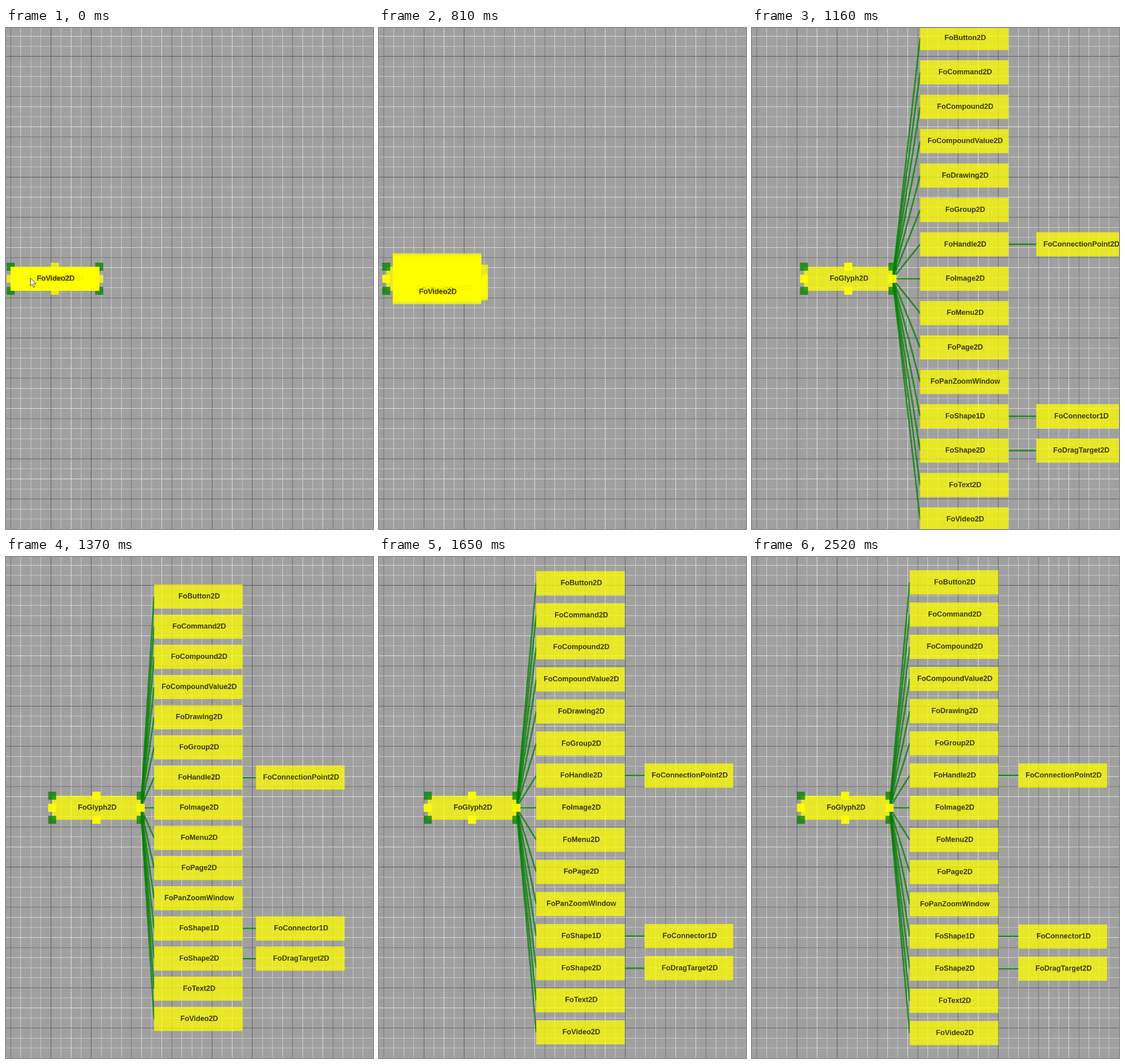
Recreate the animation shown at these times as an HTML page with a canvas. Size 640 by 875 pixels, loop 3.86 s.

```html
<!DOCTYPE html>
<html lang="en">
<head>
<meta charset="utf-8">
<title>Class tree</title>
<style>
  html, body { margin: 0; width: 100%; height: 100%; overflow: hidden; background: #a0a0a0; }
  canvas { display: block; width: 640px; height: 875px; }
</style>
</head>
<body>
<canvas id="stage" width="640" height="875"></canvas>
<script>
const stage = document.getElementById('stage');
const out = stage.getContext('2d');
out.imageSmoothingQuality = 'low';

// The diagram is drawn at full size, then shrunk onto the stage
const page = document.createElement('canvas');
const W = page.width = 911, H = page.height = 1245;
const ctx = page.getContext('2d');

const LOOP = 3860;
const X0 = 11.4, CY = 623;              // where the tree unfolds from
const BW = 220, BH = 60, KNOB = 20;
const ALPHA = 0.75;

// Depth-first order: [name, level, row relative to the root]
const NODES = [];
const LEAVES = { FoHandle2D: 'FoConnectionPoint2D', FoShape1D: 'FoConnector1D', FoShape2D: 'FoDragTarget2D' };
['FoButton2D', 'FoCommand2D', 'FoCompound2D', 'FoCompoundValue2D', 'FoDrawing2D',
 'FoGroup2D', 'FoHandle2D', 'FoImage2D', 'FoMenu2D', 'FoPage2D', 'FoPanZoomWindow',
 'FoShape1D', 'FoShape2D', 'FoText2D', 'FoVideo2D'].forEach((name, i) => {
  NODES.push([name, 1, i - 7]);
  if (LEAVES[name]) NODES.push([LEAVES[name], 2, i - 7]);
});

// Moments at which the picture refreshes
const SHORT = [4, 6, 12, 28];
const STEPS = 29;
const TICKS = [0];
for (let i = 0; i < STEPS; i++) TICKS.push(TICKS[i] + (SHORT.includes(i) ? 60 : 70));
TICKS.push(2450, 2520);

// Elastic ease in and out, sampled at an even rate
function spread(step) {
  if (step < 1) return 0;
  if (step >= STEPS) return 1;
  const ms = step * 68.05 - 1065;
  const wave = 0.5 * Math.pow(2, -10 * Math.abs(ms) / 1030) * Math.cos(2 * Math.PI * ms / 316);
  return ms < 0 ? wave : 1 - wave;
}

function line(x1, y1, x2, y2) {
  ctx.beginPath();
  ctx.moveTo(x1, y1);
  ctx.lineTo(x2, y2);
  ctx.stroke();
}

function gridLines(major) {
  for (let i = -3; i < 52; i++) {
    if ((i % 4 === 0) !== major) continue;
    line(11.5 + i * 25, 0, 11.5 + i * 25, H);
    line(0, 70.5 + i * 25, W, 70.5 + i * 25);
  }
}

function drawGrid() {
  ctx.fillStyle = '#a0a0a0';
  ctx.fillRect(0, 0, W, H);
  ctx.lineWidth = 1;
  ctx.strokeStyle = 'rgba(255,255,255,.8)';
  ctx.setLineDash([5, 1]);
  gridLines(false);
  ctx.setLineDash([]);
  ctx.strokeStyle = '#555';
  gridLines(true);
}

function drawBox(name, x, y) {
  ctx.fillStyle = '#ff0';
  ctx.fillRect(x, y - BH / 2, BW, BH);
  ctx.fillStyle = '#000';
  ctx.fillText(name, x + BW / 2 + 2, y + 5);
}

function drawKnobs(x, bright) {
  for (let i = 0; i < 3; i++) {
    for (let j = 0; j < 3; j++) {
      if (i === 1 && j === 1) continue;
      const corner = i !== 1 && j !== 1;
      ctx.fillStyle = corner ? '#008000' : '#ff0';
      ctx.globalAlpha = !corner && bright ? 0.93 : ALPHA;
      ctx.fillRect(x + i * BW / 2 - KNOB / 2, CY + (j - 1) * BH / 2 - KNOB / 2, KNOB, KNOB);
    }
  }
  ctx.globalAlpha = ALPHA;
}

function drawPointer(x, y) {
  out.beginPath();
  [[0.5, 0.5], [0.5, 14.5], [3.7, 11.6], [6, 17], [8.3, 16], [6, 10.8], [10.5, 10.6]]
    .forEach(([a, b]) => out.lineTo(x + a, y + b));
  out.closePath();
  out.fillStyle = '#eee';
  out.fill();
  out.lineWidth = 0.9;
  out.strokeStyle = '#444';
  out.stroke();
}

function draw(step) {
  const t = TICKS[step], p = spread(step);
  const left = level => X0 + (110 + 270 * level) * p;
  const mid = row => CY + row * 80 * p;

  ctx.globalAlpha = 1;
  drawGrid();

  ctx.globalAlpha = ALPHA;
  ctx.font = 'bold 18px "Liberation Sans", Arial, sans-serif';
  ctx.textAlign = 'center';
  ctx.strokeStyle = '#008000';
  ctx.lineWidth = 4;
  for (const [, level, row] of NODES) {
    line(left(level - 1) + BW, level === 1 ? CY : mid(row), left(level), mid(row));
  }

  drawBox('FoGlyph2D', left(0), CY);
  drawKnobs(left(0), t >= 610);
  for (const [name, level, row] of NODES) drawBox(name, left(level), mid(row));

  out.drawImage(page, 0, 0, stage.width, stage.height);
  if (t < 210) drawPointer(42 - t / 28, 436 + t * 24 / 140);
  if (t === 2450) drawPointer(153, 832);
}

const start = performance.now();
let shown = 0;
function frame() {
  const now = (performance.now() - start) % LOOP;
  const step = TICKS.filter(t => t <= now).length - 1;
  if (step !== shown) draw(shown = step);
  requestAnimationFrame(frame);
}
draw(shown);
requestAnimationFrame(frame);
</script>
</body>
</html>
```
